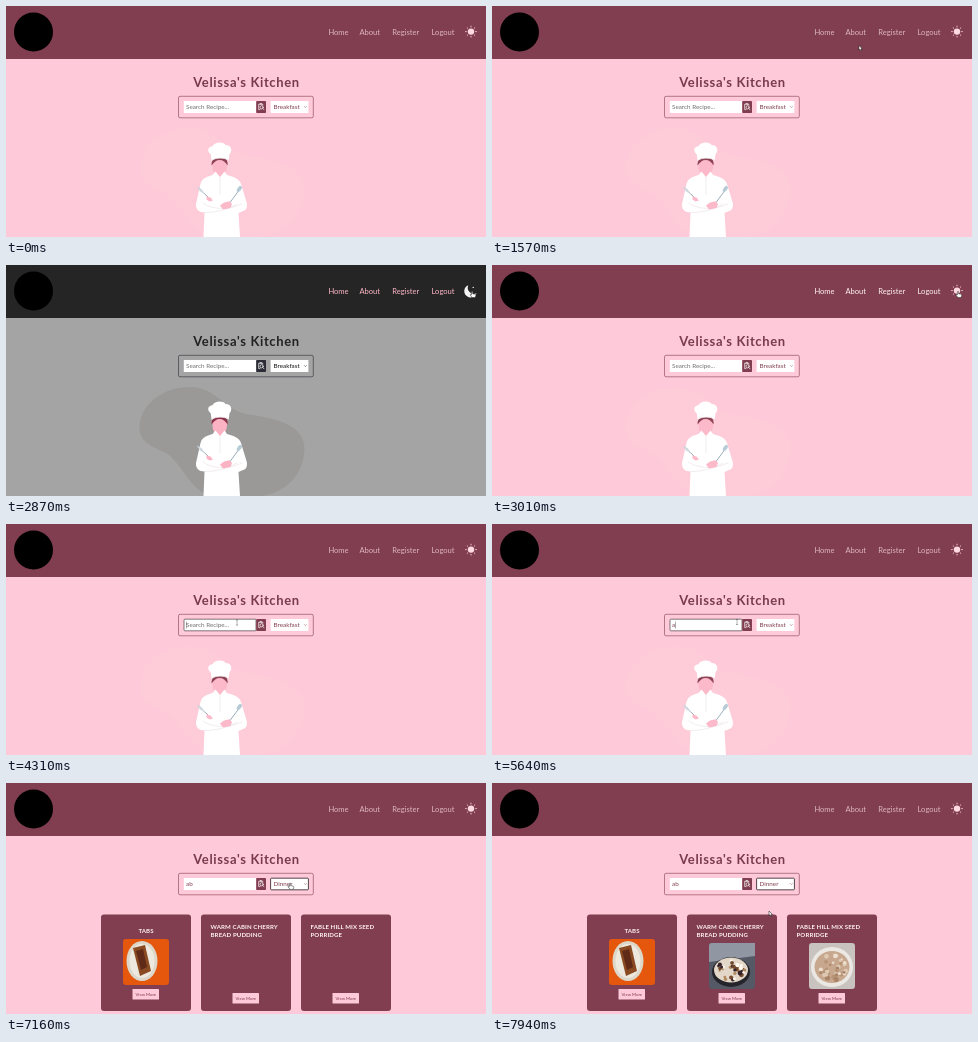
Write an HTML page that moves like this. It is 480 by 231 pixels and loops after 8 s.

```html
<!DOCTYPE html>
<html lang="en">
<head>
<meta charset="utf-8">
<title>Recipe search</title>
<style>
  html, body { margin: 0; width: 100%; height: 100%; overflow: hidden; }
  svg { display: block; width: 100vw; height: 100vh; font-family: Lato, "Open Sans", sans-serif; }
  #app {
    --bar: #803e50; --page: #fec9d8; --blob: #fecbd9; --ink: #803e50;
    --title: #783a4c; --pick: #803e50; --hair: #8d4355; --skin: #fbb9c9;
  }
  #app.dark {
    --bar: #252525; --page: #a4a4a4; --blob: #9a9998; --ink: #2b2b35;
    --title: #222; --pick: #111; --hair: #8b3148; --skin: #fbb3c4;
  }
  .bar { fill: var(--bar); }
  .page { fill: var(--page); }
  .blob { fill: var(--blob); }
  .ink { fill: var(--ink); }
  .hair { fill: var(--hair); }
  .skin { fill: var(--skin); }
  .title { fill: var(--title); font-size: 13px; font-weight: 700; letter-spacing: .65px; }
  .nav { font-size: 7.6px; }
  .field { font-size: 6.3px; }
  .line { fill: none; stroke-linecap: round; stroke-linejoin: round; }
  .name { fill: #fff0f3; font-size: 6.1px; font-weight: 700; letter-spacing: .1px; }
  .more { fill: #803e50; font-size: 4.3px; }
  .mid { text-anchor: middle; }
</style>
</head>
<body>
<svg viewBox="0 0 480 231" preserveAspectRatio="none">
<g id="app">
  <rect class="page" width="480" height="231"/>
  <rect class="bar" width="480" height="53"/>
  <circle cx="27.5" cy="26" r="19.5" fill="#000"/>

  <g id="nav" class="nav mid">
    <text x="332.5" y="29.2">Home</text>
    <text x="363.7" y="29.2">About</text>
    <text x="399.7" y="29.2">Register</text>
    <text x="437" y="29.2">Logout</text>
  </g>
  <g id="sun" fill="#ffd9e1" stroke="#ffd9e1" stroke-width=".9">
    <circle cx="465" cy="25.6" r="3.2" stroke="none"/>
    <path id="rays" class="line"/>
  </g>
  <g id="moon" fill="#f4f4f4">
    <path d="M462.3 20.2A6.3 6.3 0 1 0 470.5 28.2A6.1 6.1 0 0 1 462.3 20.2Z"/>
    <circle cx="467.2" cy="22.4" r=".7"/>
  </g>

  <text class="title mid" x="240.5" y="81.4">Velissa's Kitchen</text>
  <rect x="172.5" y="90.3" width="134.8" height="21.5" rx="1.600" fill="none" stroke="var(--ink)" stroke-width=".6"/>
  <rect x="177.8" y="95" width="72.4" height="12" fill="#fff"/>
  <rect id="focus" x="178" y="95.2" width="72" height="11.600" rx=".8" fill="none" stroke="#2a2024" stroke-width=".6"/>
  <text id="query" class="field" x="180" y="103.3"></text>
  <rect id="caret" x="180" y="97.600" width=".4" height="6.800" fill="#333"/>
  <rect class="ink" x="250.2" y="95" width="9.800" height="12" rx=".8"/>
  <g class="line" stroke="#fff" stroke-width=".7">
    <path d="M254 103.600H252.700V98.200H256.800V99.200M254 98.200V97.600H255.600V98.200"/>
    <circle cx="255.600" cy="101.300" r="1.600"/>
    <path d="M256.800 102.500L258 103.800"/>
  </g>
  <rect x="264.600" y="95" width="37.800" height="12" fill="#fff"/>
  <rect id="pickFocus" x="264.600" y="95.200" width="37.800" height="11.600" rx=".8" fill="none" stroke="#2a1a20" stroke-width=".8"/>
  <text id="pick" class="field" x="267.600" y="103.300" fill="var(--pick)"></text>
  <path class="line" d="M298.500 100.600L299.400 101.500L300.300 100.600" stroke="var(--pick)" stroke-width=".5"/>

  <g id="chef">
    <path class="blob" d="M133.500 162C134 139 158 121 186 122C210 123 218 144 240 149C266 153 299 158 298.500 184C298 208 280 229 254 231H205C184 226 176 198 160 188C145 181 133 177 133.500 162Z"/>
    <path class="skin" d="M206.500 154H221V160C221 165 218.500 168 217.500 168.500V174H210V168.500C208.500 168 206.500 165 206.500 160Z"/>
    <path class="hair" d="M205.600 159.500C205.400 155.500 207 152.500 210 151.800H217.500C220.500 152.500 222 155.500 221.600 159.500C219.500 156 217 154 213.600 154C210.500 154 208 156 205.600 159.500Z"/>
    <path fill="#fff" d="M205.500 154.800L204.800 148.500C200.500 145 202 140.500 206.500 140.300C208.500 135.800 217 135.500 219.500 139C224.500 138.800 227.400 144 223.500 148.300L222.700 154.500C218 151.500 210 151.500 205.500 154.800Z"/>
    <path fill="#fff" d="M209.500 165.500L214 171L218.500 165.500L221 169C228 171 233 172.500 235 178L240.800 197C241.500 201.500 240 204.500 237 205L232.500 207L234 231H197.500L198.500 206.500C193 206.500 189.500 203 190 198L194.500 178C196 172.500 200 171 206.500 169Z"/>
    <g class="line" stroke="#e7dfe4" stroke-width=".6">
      <path d="M214 171V188M197 197C204 203 221 205 236 198M198.500 206.500C209 206.500 220 204.500 231 198M206 154C211 151.500 218 151.500 222.500 154"/>
    </g>
    <path class="line" d="M192.500 182L203.500 192.500" stroke="#8f9aa3" stroke-width=".9"/>
    <path d="M190.600 180.500L195.500 183L199.500 188.500L194 185.500Z" fill="#cfd9e0"/>
    <path class="line" d="M232.500 185L224 196.500" stroke="#8fa5b3" stroke-width=".9"/>
    <ellipse cx="233.300" cy="183" rx="1.900" ry="3.500" transform="rotate(35 233.300 183)" fill="#b7cbd6"/>
    <path class="skin" d="M200.500 190.500L204.500 191.500L207 194.500L203.500 195.500L200.500 193.500ZM214 199.500L218 196.500L223.500 195.300L226 198L224.500 202L217 203.500Z"/>
  </g>
  <g id="cards"></g>

  <g id="cursor" stroke-linejoin="round">
    <path id="arrow" d="M0 0V4.6L1.100 3.700L1.900 5.300L2.700 4.900L2 3.400H3.400Z" fill="#fff" stroke="#111" stroke-width=".5"/>
    <path id="hand" d="M0 .2C.2 -.5 1.100 -.5 1.200 .2V2.200L3.800 2.700C4.400 2.900 4.500 3.400 4.300 4.200L3.700 6H.7L-1.400 3.400C-1.500 2.800 -.9 2.600 0 3.300Z" fill="#fff" stroke="#222" stroke-width=".5"/>
    <path id="beam" class="line" d="M-.7 0H.7M0 0V5M-.7 5H.7" stroke="#444" stroke-width=".4"/>
  </g>
</g>
</svg>
<script>
const LOOP = 8000;
const $ = id => document.getElementById(id);
const show = (id, on) => $(id).setAttribute('visibility', on ? 'visible' : 'hidden');

// time, x, y, pointer shape
const path = [
  [500, 471, 217, 'arrow'], [1300, 369, 54.5, 'arrow'], [1370, 368.5, 52, 'arrow'],
  [1570, 367, 39.5, 'arrow'], [1720, 359, 31, 'hand'], [1820, 374, 29, 'arrow'],
  [2090, 465, 26.5, 'hand'], [2870, 465.5, 26.5, 'hand'], [3010, 465.5, 26.5, 'hand'],
  [3110, 452, 34, 'arrow'], [3700, 238, 95, 'beam'], [3770, 231, 96, 'beam'],
  [4560, 231, 96, 'beam'], [4580, 245, 95.5, 'beam'], [5900, 245, 95.5, 'beam'],
  [6150, 253, 98, 'hand'], [6210, 255, 99, 'hand'], [6460, 255, 99, 'hand'],
  [6660, 268, 98.5, 'hand'], [6850, 282, 99, 'hand'], [7290, 284, 101, 'arrow'],
  [7940, 277, 128, 'arrow']
];

const foods = [
  (x, y) => `<rect x="${x}" y="${y}" width="46" height="46" rx="3" fill="#e4570d"/>
    <ellipse cx="${x + 19}" cy="${y + 22}" rx="15.500" ry="20" fill="#ddd7ca"/>
    <ellipse cx="${x + 19}" cy="${y + 22}" rx="12.500" ry="17" fill="#eee9df"/>
    <path d="M${x + 10} ${y + 9}L${x + 22} ${y + 6}L${x + 28} ${y + 32}L${x + 17} ${y + 37}Z" fill="#8a4a22"/>
    <path d="M${x + 13} ${y + 12}L${x + 20} ${y + 10}L${x + 24} ${y + 28}L${x + 18} ${y + 31}Z" fill="#5f2b18"/>`,
  (x, y) => `<rect x="${x}" y="${y}" width="46" height="46" rx="3" fill="#555965"/>
    <path d="M${x} ${y + 3}Q${x} ${y} ${x + 3} ${y}H${x + 46}V${y + 13}L${x} ${y + 19}Z" fill="#9097a2"/>
    <ellipse cx="${x + 22}" cy="${y + 29}" rx="19" ry="15" fill="#25242a"/>
    <ellipse cx="${x + 22}" cy="${y + 27}" rx="17" ry="12.500" fill="#e2d7c9"/>
    ${bits(x + 22, y + 27, 14, 10, 32, ['#73482c', '#b1895f', '#fff8ee', '#35222a'], 5)}`,
  (x, y) => `<rect x="${x}" y="${y}" width="46" height="46" rx="3" fill="#c9c3c0"/>
    <ellipse cx="${x + 23}" cy="${y + 24}" rx="21" ry="20" fill="#ebe7e3"/>
    <ellipse cx="${x + 23}" cy="${y + 24}" rx="17.500" ry="16" fill="#c7a88e"/>
    ${bits(x + 23, y + 24, 15, 13, 34, ['#dec9b3', '#a98468', '#ecdfd0', '#b89477'], 9)}`
];

function bits(cx, cy, rx, ry, count, colors, seed) {
  const rand = () => (seed = seed * 16807 % 2147483647) / 2147483647;
  let out = '';
  for (let i = 0; i < count; i++) {
    const a = rand() * 7 + i, d = Math.sqrt(rand());
    out += `<circle cx="${(cx + Math.cos(a) * d * rx).toFixed(1)}" cy="${(cy + Math.sin(a) * d * ry).toFixed(1)}"
      r="${(1 + rand() * 1.5).toFixed(1)}" fill="${colors[i % colors.length]}"/>`;
  }
  return out;
}

function card(i, lines) {
  const x = 95 + i * 100, y = lines.length > 1 ? 160 : 156;
  const names = lines.length > 1
    ? lines.map((s, n) => `<text class="name" x="${x + 9.5}" y="${145.6 + n * 8.2}">${s}</text>`).join('')
    : `<text class="name mid" x="${x + 45}" y="149.700">${lines[0]}</text>`;
  return `<rect x="${x}" y="131.500" width="90" height="96.500" rx="3" fill="#803e50"/>${names}
    <g id="food${i}">${foods[i](x + 22, y)}</g>
    <rect x="${x + 31.5}" y="${y + 50}" width="26.500" height="10.500" rx=".5" fill="#fec9d8"/>
    <text class="more mid" x="${x + 44.8}" y="${y + 56.9}">View More</text>`;
}

$('cards').innerHTML = [
  ['TABS'],
  ['WARM CABIN CHERRY', 'BREAD PUDDING'],
  ['FABLE HILL MIX SEED', 'PORRIDGE']
].map((lines, i) => card(i, lines)).join('');

$('rays').setAttribute('d', Array.from({ length: 8 }, (_, i) => {
  const c = Math.cos(i * Math.PI / 4), s = Math.sin(i * Math.PI / 4);
  return `M${465 + c * 4.7} ${25.6 + s * 4.7}L${465 + c * 5.4} ${25.6 + s * 5.4}`;
}).join(''));

function moveCursor(t) {
  let i = path.findIndex(p => p[0] > t) - 1;
  if (i < -1) i = path.length - 1;
  const a = path[Math.max(i, 0)], b = path[i + 1] || a;
  const k = b === a ? 0 : Math.max(0, (t - a[0]) / (b[0] - a[0]));
  const x = a[1] + (b[1] - a[1]) * k, y = a[2] + (b[2] - a[2]) * k;
  $('cursor').setAttribute('transform', `translate(${x} ${y})`);
  for (const shape of ['arrow', 'hand', 'beam']) show(shape, t >= 500 && a[3] === shape);
}

function navColor(t, dark) {
  if (dark) return '#ffb7c8';
  const k = t < 3010 ? 1 : Math.min(1, Math.max(0, (t - 3080) / 300));
  const mix = (a, b) => Math.round(a + (b - a) * k);
  return `rgb(${mix(255, 221)},${mix(242, 181)},${mix(245, 192)})`;
}

function draw(t) {
  const dark = t >= 2230 && t < 3010;
  const focused = t >= 3840 && t < 6270;
  const typed = t < 5500 ? '' : t < 5700 ? 'a' : 'ab';
  const found = t >= 7030;

  $('app').setAttribute('class', dark ? 'dark' : '');
  $('nav').setAttribute('fill', navColor(t, dark));
  show('sun', !dark);
  show('moon', dark);

  $('query').textContent = typed || 'Search Recipe...';
  $('query').setAttribute('fill', typed ? '#803e50' : '#707070');
  show('focus', focused);
  const blinkOn = typed ? (t - 5700) % 1060 < 530 : Math.floor((t - 3840) / 533) % 2 === 0;
  show('caret', focused && blinkOn);
  $('caret').setAttribute('x', 180 + typed.length * 3.4);

  $('pick').textContent = t < 6960 ? 'Breakfast' : 'Dinner';
  show('pickFocus', t >= 6850);

  show('chef', !found);
  $('cards').style.display = found ? '' : 'none';
  [7160, 7290, 7420].forEach((at, i) => show('food' + i, found && t >= at));
  moveCursor(t);
}

const start = performance.now();
function tick() {
  draw((performance.now() - start) % LOOP);
  requestAnimationFrame(tick);
}
tick();
</script>
</body>
</html>
```
